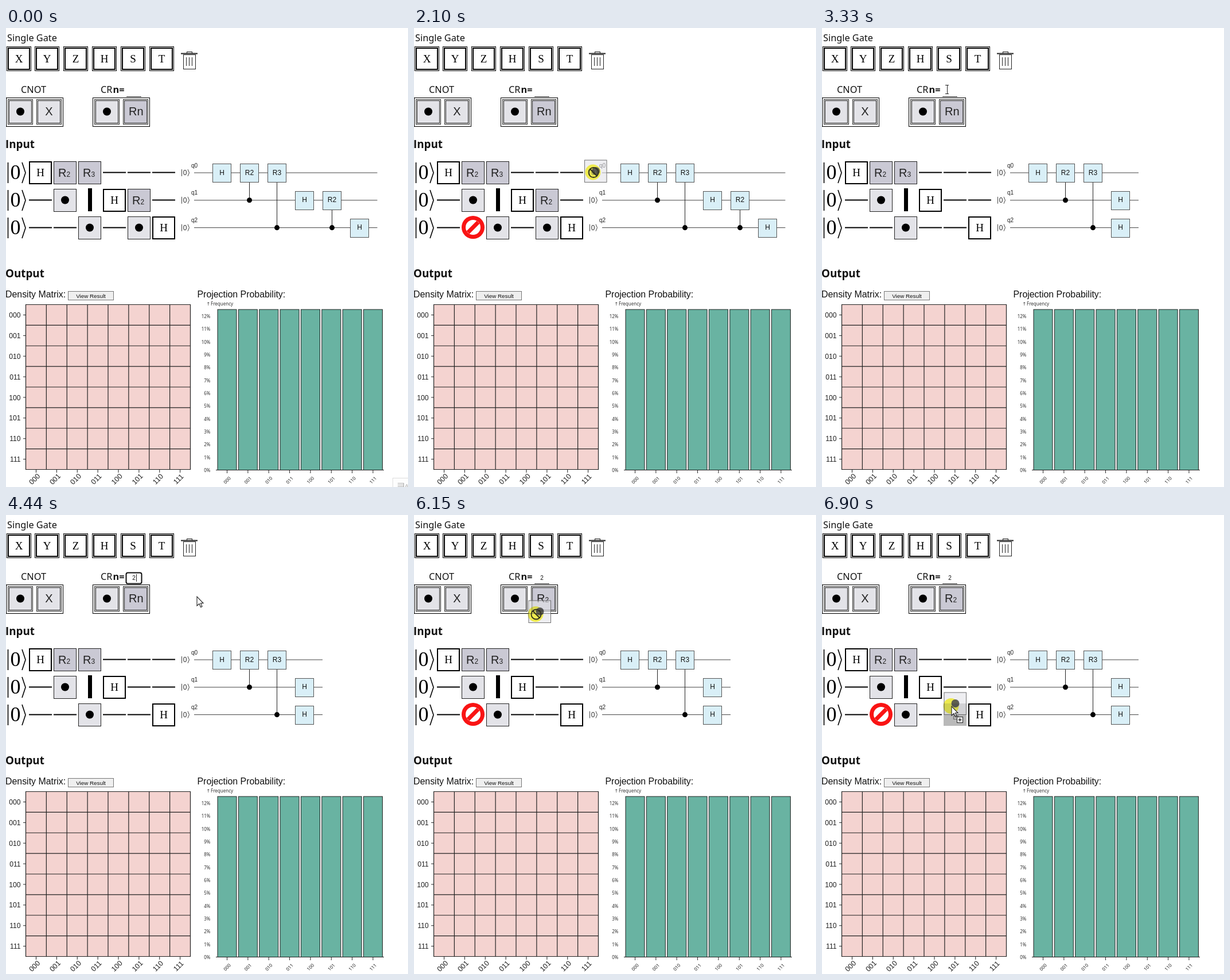
These frames come from a looping animation (701x799 px, 8000 ms). An HTML page with a canvas:

```html
<!DOCTYPE html>
<html lang="en">
<head>
<meta charset="utf-8">
<title>Quantum circuit editor</title>
<style>
html, body { margin: 0; width: 100%; height: 100%; overflow: hidden; background: #fff; }
canvas { display: block; }
</style>
</head>
<body>
<canvas id="stage" width="701" height="799"></canvas>
<script>
const LOOP = 8000;
const g = document.getElementById('stage').getContext('2d');
const SANS = '"Liberation Sans", Arial, sans-serif';
const SERIF = '"Liberation Serif", serif';
const NOTO = '"Noto Sans", sans-serif';
const OPEN = '"Open Sans", sans-serif';
const PALE = '#e3e3e8', GREY = '#cac9d4';
const STATES = [...Array(8).keys()].map(i => i.toString(2).padStart(3, '0'));

// Pointer positions: time, x, y
const PATH = [
  [70, 701, 681], [200, 627, 624], [440, 456, 492], [820, 231, 384],
  [890, 231, 384], [1030, 226, 360], [1400, 226, 360], [1630, 230, 372],
  [1960, 230, 372], [2100, 313, 252], [2500, 324, 57],
  [2980, 324, 57], [3330, 218, 107], [3810, 218, 107], [4440, 333, 142],
  [4640, 333, 142], [4920, 225, 168], [5200, 170, 150],
  [5470, 170, 150], [6150, 213, 173], [6220, 213, 173],
  [6530, 249, 250], [6900, 226, 333]
];

function pointer(t) {
  const i = PATH.findIndex(p => p[0] > t);
  if (i < 0) return PATH[PATH.length - 1].slice(1);
  if (i === 0) return null;
  const [t0, x0, y0] = PATH[i - 1], [t1, x1, y1] = PATH[i];
  const k = (t - t0) / (t1 - t0);
  return [x0 + (x1 - x0) * k, y0 + (y1 - y0) * k];
}

function text(str, x, y, size, family = SANS, align = 'left', color = '#111', weight = '') {
  g.font = `${weight} ${size}px ${family}`;
  g.textAlign = align;
  g.fillStyle = color;
  g.fillText(str, x, y);
}

function fill(x, y, w, h, color) {
  g.fillStyle = color;
  g.fillRect(x, y, w, h);
}

function box(x, y, w, h, back, line = '#222', width = 1) {
  fill(x, y, w, h, back);
  g.strokeStyle = line;
  g.lineWidth = width;
  g.strokeRect(x + width / 2, y + width / 2, w - width, h - width);
}

function line(points, width = 1, color = '#222') {
  g.beginPath();
  points.forEach(([x, y], i) => i ? g.lineTo(x, y) : g.moveTo(x, y));
  g.strokeStyle = color;
  g.lineWidth = width;
  g.stroke();
}

function disc(x, y, r, color = '#000') {
  g.beginPath();
  g.arc(x, y, r, 0, 7);
  g.fillStyle = color;
  g.fill();
}

function tilted(str, x, y, size, family) {
  g.save();
  g.translate(x, y);
  g.rotate(-Math.PI / 4);
  text(str, 0, size * 0.36, size, family, 'center', '#222');
  g.restore();
}

function rotation(n, cx, cy) {
  text('R', cx - 11.5, cy + 7, 20, SANS, 'left', '#222');
  text(n, cx + 3, cy + 7, n === 'n' ? 20 : 12, SANS, 'left', '#222');
}

function drawPalette(s) {
  text('Single Gate', 2, 23, 16.3, NOTO);
  [...'XYZHST'].forEach((name, i) => {
    const x = Math.round(0.5 + i * 49.8);
    box(x, 32, 43, 43, '#fff', '#000');
    box(x + 2, 34, 39, 39, '#fff', '#000', 2);
    text(name, x + 21.5, 60, 19, SERIF, 'center', '#000');
  });

  line([[305, 44.5], [334, 44.5]], 2);
  g.lineWidth = 1;
  g.strokeRect(315.5, 41.5, 9, 3);
  box(309, 46, 22, 26, '#fff', '#222');
  for (const x of [314.5, 319.5, 324.5]) line([[x, 51], [x, 66]]);

  text('CNOT', 26, 113, 16.3, NOTO);
  text('CR', 165, 113, 16.3, NOTO);
  text('n=', 186.5, 113, 16.3, OPEN, 'left', '#111', 'bold');
  for (const x of [0, 151]) {
    box(x, 121, 100, 51, '#fff', '#000');
    [PALE, x ? GREY : PALE].forEach((color, i) => {
      box(x + 3 + i * 50, 124, 44, 44, '#fff');
      box(x + 5 + i * 50, 126, 40, 40, color);
    });
    disc(x + 25, 145.5, 7);
  }
  text('X', 75, 152, 20, SANS, 'center', '#222');
  rotation(s.applied ? '2' : 'n', 225.5, 145);

  if (s.focused) {
    g.beginPath();
    g.roundRect(209.5, 100.5, 27, 19, 3);
    g.fillStyle = '#fff';
    g.fill();
    g.strokeStyle = '#111';
    g.lineWidth = 2;
    g.stroke();
    if (s.caret) line([[227.5, 103], [227.5, 116]]);
  } else {
    line([[210, 119.5], [236, 119.5]]);
  }
  if (s.typed) text('2', 223, 113, 10, SANS, 'center');
}

function drawGrid(s) {
  const px = c => 40 + c * 43, py = r => 232 + r * 48;
  const wire = (r, ...cols) => cols.forEach(c => fill(px(c), py(r) + 18.5, 40, 2, '#000'));
  const h = (r, c) => {
    box(px(c), py(r), 40, 40, '#fff', '#000', 2);
    text('H', px(c) + 20, py(r) + 25.5, 19, SERIF, 'center', '#000');
  };
  const rot = (r, c, n) => {
    box(px(c), py(r), 40, 40, GREY);
    rotation(n, px(c) + 19.5, py(r) + 19.5);
  };
  const dot = (r, c) => {
    box(px(c), py(r), 40, 40, PALE);
    disc(px(c) + 20, py(r) + 19.5, 7);
  };

  for (let r = 0; r < 3; r++) {
    const y = py(r);
    line([[3.5, y + 2], [3.5, y + 38]], 1.6, '#000');
    text('0', 16.5, y + 31, 36, SERIF, 'center', '#000');
    line([[28, y + 2], [34, y + 20], [28, y + 38]], 1.6, '#000');
  }
  wire(0, 3, 4, 5);
  wire(1, 0, 5);
  wire(2, 0, 3);
  h(0, 0); h(1, 3); h(2, 5);
  rot(0, 1, '2'); rot(0, 2, '3');
  dot(1, 1); dot(2, 2);
  fill(143, 279, 7, 40, '#000');

  if (s.removed) {
    wire(1, 4);
    if (s.target) fill(212, 328, 40, 39, '#b9b9b9');
    else wire(2, 4);
  } else {
    rot(1, 4, '2');
    dot(2, 4);
  }
  if (s.dragging) {
    disc(103, 347, 20, '#f91414');
    disc(103, 347, 13, '#fff');
    line([[94, 356], [112, 338]], 7, '#f91414');
  } else wire(2, 1);
}

function drawCircuit(s) {
  const cx = c => 376 + c * 48, cy = r => 252 + r * 47.8;
  const gate = (r, c, name) => {
    box(cx(c) - 16, 236 + r * 48, 33, 33, '#d9eff7', '#555');
    text(name, cx(c) + 0.5, cy(r) + 3.5, 12, SANS, 'center');
  };
  const control = (c, from, to) => {
    line([[cx(c) + 0.5, cy(from)], [cx(c) + 0.5, cy(to)]]);
    disc(cx(c) + 0.5, cy(to), 4.5);
  };
  for (let r = 0; r < 3; r++) {
    const y = cy(r);
    line([[306.5, y - 6], [306.5, y + 6]], 1, '#444');
    text('0', 312, y + 4, 12, SANS, 'center', '#333');
    line([[317, y - 6], [319.5, y], [317, y + 6]], 1, '#444');
    text('q' + r, 323, y - 9.5, 10, SANS, 'left', '#222');
    line([[328, y], [s.removed ? 552 : 647.5, y]], 1, '#444');
  }
  control(1, 0, 1);
  control(2, 0, 2);
  gate(0, 0, 'H'); gate(0, 1, 'R2'); gate(0, 2, 'R3');
  gate(1, 3, 'H');
  if (s.removed) gate(2, 3, 'H');
  else {
    control(4, 1, 2);
    gate(1, 4, 'R2');
    gate(2, 5, 'H');
  }
}

function drawOutput() {
  text('Input', -1, 209, 18.8, OPEN, 'left', '#111', 'bold');
  text('Output', -1, 434, 18.8, OPEN, 'left', '#111', 'bold');
  text('Density Matrix:', -1, 469, 15.9);
  text('Projection Probability:', 333.5, 469, 15.9);
  box(108, 458, 80, 16, '#efefef', '#777');
  text('View Result', 148, 469.5, 9.8, SANS, 'center');

  const step = 35.875;
  fill(34, 482, 288, 287, '#f4d3d0');
  for (let i = 0; i <= 8; i++) {
    const x = 34.5 + i * step, y = 481.5 + i * step;
    line([[x, 481], [x, 769]], 1.2);
    line([[34, y], [322, y]], 1.2);
  }
  STATES.forEach((name, i) => {
    const x = 52.5 + i * step, y = 499.5 + i * step;
    line([[30, y], [34, y]]);
    line([[x, 769], [x, 774]]);
    text(name, 25.5, y + 4.5, 12.1, SANS, 'right', '#222');
    tilted(name, x - 3, 785, 12.5, SANS);
  });

  text('↑', 349.5, 483, 8, '"DejaVu Sans", sans-serif', 'left', '#333');
  text('Frequency', 357, 483, 8, NOTO, 'left', '#333');
  for (let p = 0; p <= 12; p++)
    text(p + '%', 356.5, 773 - p * 22.35, 8, NOTO, 'right', '#333');
  STATES.forEach((name, i) => {
    const x = 369 + i * 36.35;
    g.lineWidth = 1;
    g.strokeStyle = '#222';
    g.fillStyle = '#69b3a2';
    g.fillRect(x, 490, 33, 279.5);
    g.strokeRect(x, 490, 33, 279.5);
    line([[x + 16.5, 770], [x + 16.5, 775]]);
    tilted(name, x + 16.5, 787, 8, NOTO);
  });
  line([[366, 769.5], [659, 769.5]]);
}

function drawGhost(x, y) {
  g.save();
  g.globalAlpha = 0.6;
  box(x, y, 39.5, 39.5, PALE);
  disc(x + 20, y + 19.5, 7);
  g.restore();
}

const ARROW = new Path2D('M0 0V16L4 12.5L6.6 18.5L9 17.5L6.5 11.5H11Z');
const HAND = new Path2D('M-2 12V1Q0 -2 2 1V7Q5 5 5.5 8Q8 6.5 8.5 9Q10.5 8.5 10 12Q10 17 7 21H-1Q-4 16 -7 12Q-6 8.5 -2 12.5M2 7V11M5.5 8V11M8.5 9V12');

function drawCursor(kind, x, y) {
  g.save();
  g.translate(x, y);
  if (kind === 'stop') {
    g.beginPath();
    g.arc(0, 0, 8.5, 0, 7);
    g.strokeStyle = '#33331c';
    g.lineWidth = 1.8;
    g.stroke();
    line([[-6, -6], [6, 6]], 2, '#33331c');
  } else if (kind === 'beam') {
    line([[-3, -7.5], [3, -7.5]]);
    line([[0.5, -8], [0.5, 8]]);
    line([[-3, 7.5], [3, 7.5]]);
  } else {
    const shape = kind === 'hand' ? HAND : ARROW;
    g.fillStyle = '#fff';
    g.strokeStyle = '#222';
    g.lineWidth = 1.1;
    g.fill(shape);
    g.stroke(shape);
    if (kind === 'copy') {
      g.setLineDash([1, 1]);
      g.strokeRect(3.5, 16.5, 8, 6);
      g.setLineDash([]);
      box(9, 18, 11, 11, '#fff');
      line([[11.5, 23.5], [17.5, 23.5]], 1.4);
      line([[14.5, 20.5], [14.5, 26.5]], 1.4);
    }
  }
  g.restore();
}

function draw(t) {
  const between = (a, b) => t >= a && t < b;
  const first = between(1430, 2980), second = t >= 5470;
  const s = {
    dragging: first || second,
    removed: t >= 2980,
    focused: between(3540, 4780),
    typed: t >= 4200,
    applied: t >= 4780,
    caret: between(4200, 4780),
    target: t >= 6760
  };
  fill(0, 0, 701, 799, '#fff');
  drawPalette(s);
  drawGrid(s);
  drawCircuit(s);
  drawOutput();

  if (t < 70) {
    box(674, 783, 30, 20, '#fdfdfd', '#ddd');
    for (const y of [792.5, 795.5, 798.5]) line([[683, y], [693, y]], 1, '#aaa');
    line([[693.5, 792], [693.5, 799]], 1, '#aaa');
    text('A', 696, 799, 8, SANS, 'left', '#aaa');
  }

  const p = pointer(t);
  if (!p) return;
  const [x, y] = p;
  if (first) drawGhost(x - 16, y - 22);
  if (second) drawGhost(x - 13.5, y - 24.5);
  if (between(1360, 2980) || between(3540, 3680) || t >= 5400) {
    // Darken keeps black marks visible under the highlight
    g.globalCompositeOperation = 'darken';
    disc(x - 1, y - 0.5, 13.5, '#eeea4e');
    g.globalCompositeOperation = 'source-over';
  }
  let kind = 'arrow';
  if (first) kind = y < 75 ? 'copy' : 'stop';
  else if (second) kind = s.target ? 'copy' : 'stop';
  else if (between(960, 1430) || between(5060, 5470)) kind = 'hand';
  else if (between(3260, 3950)) kind = 'beam';
  drawCursor(kind, x, y);
}

const start = performance.now();
function tick() {
  draw((performance.now() - start) % LOOP);
  requestAnimationFrame(tick);
}
tick();
</script>
</body>
</html>
```
